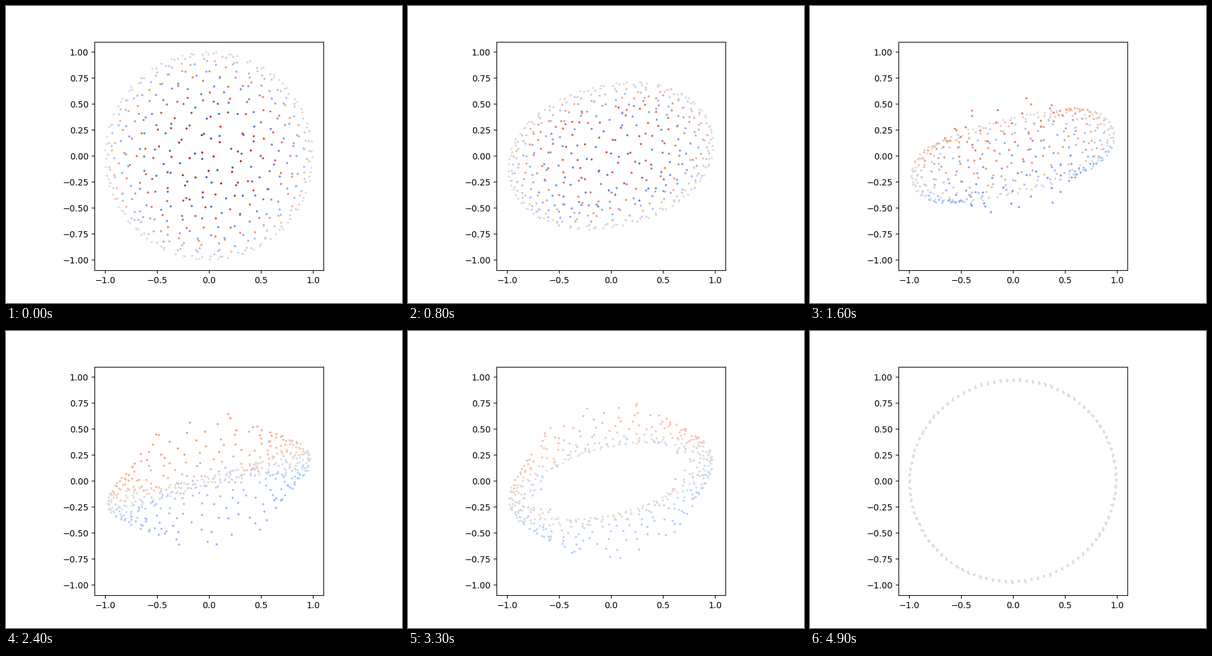
These frames come from a looping animation (640 px wide and 480 px high, 5000 ms). A matplotlib script:

```python
import numpy as np
import matplotlib.pyplot as plt
from matplotlib.animation import FuncAnimation

FRAMES = 50
N_SPHERE = 500
N_CIRCLE = 100
AXIS = 0.235          # direction in the plane that stays fixed
LEAN = np.pi / 6      # weight of depth in the projection to the circle


def sphere_points(n, jitter=0.025):
    """Fibonacci sphere with slightly loosened points."""
    i = np.arange(n)
    z = 1 - (2 * i + 1) / n
    theta = np.pi * (3 - np.sqrt(5)) * i
    r = np.sqrt(1 - z**2)
    pts = np.column_stack([r * np.cos(theta), r * np.sin(theta), z])
    pts += np.random.default_rng(4).normal(0, jitter, pts.shape)
    return pts / np.linalg.norm(pts, axis=1, keepdims=True)


def circle_targets(pts):
    """Project to a tilted plane and share the circle's points out equally."""
    x, y, z = pts.T
    along = x * np.cos(AXIS) + y * np.sin(AXIS)
    across = y * np.cos(AXIS) - x * np.sin(AXIS)
    up = z * np.sin(LEAN) - across * np.cos(LEAN)
    step = 2 * np.pi / N_CIRCLE
    angle = (np.arctan2(up, along) + AXIS + step / 2) % (2 * np.pi)
    rank = np.argsort(np.argsort(angle))
    snapped = rank * N_CIRCLE // len(pts) * step
    return np.column_stack([np.cos(snapped), np.sin(snapped), 0 * snapped])


start = sphere_points(N_SPHERE)
end = circle_targets(start)

fig, ax = plt.subplots(figsize=(6.4, 4.8), dpi=100)
ax.set(xlim=(-1.1, 1.1), ylim=(-1.1, 1.1), aspect="equal")
ax.set_xticks(np.arange(-1, 1.1, 0.5))
ax.set_yticks(np.arange(-1, 1.1, 0.25))
dots = ax.scatter(start[:, 0], start[:, 1], c=start[:, 2], s=2,
                  cmap="coolwarm", vmin=-1, vmax=1)


def update(frame):
    t = frame / FRAMES
    pts = (1 - t) * start + t * end
    dots.set_offsets(pts[:, :2])
    dots.set_array(pts[:, 2])
    return (dots,)


anim = FuncAnimation(fig, update, frames=FRAMES, interval=100,
                     repeat=True, repeat_delay=0)
plt.show()
```
